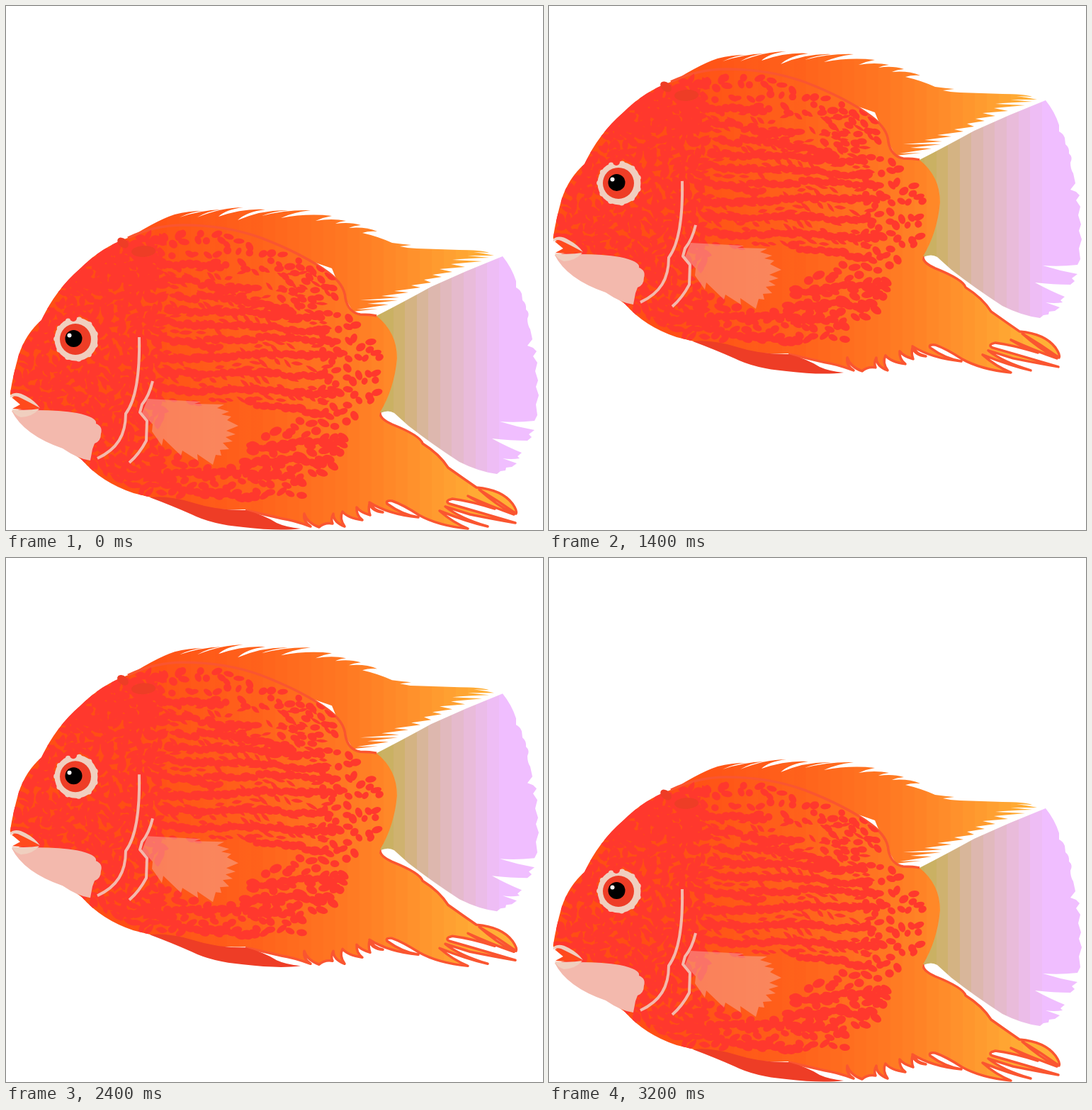
An HTML page with a canvas for the animation above (3.4 s loop, 758 px wide and 739 px high).

```html
<!DOCTYPE html>
<html lang="en">
<head>
<meta charset="utf-8">
<title>Swimming fish</title>
<style>
html, body { margin: 0; width: 100%; height: 100%; overflow: hidden; background: #fff; }
canvas { display: block; }
</style>
</head>
<body>
<canvas id="stage" width="758" height="739"></canvas>
<script>
const ctx = document.getElementById('stage').getContext('2d');
const W = 758, H = 739, STEP = 200, LOOP = 3400;
const RED = '#ff382d', DARK = '#ee3d26', PINK = '#f3b9ad', BEIGE = '#f0cfbf', EDGE = '#fa5530';

const path = d => new Path2D(d);

const tail = path(`M523 437 Q560 418 600 396 Q650 373 701 353 Q714 369 720 388 L720 397 Q726 400 728 406
  L729 415 Q735 420 734 428 Q740 433 736 441 Q736 450 740 456 L743 470 L736 479 L744 482 L749 487
  L744 494 L750 503 L747 515 L751 528 L748 537 L752 549 L748 562 L750 577 L746 585 Q720 588 697 586
  L722 593 L746 598 L738 604 L742 608 L736 613 Q712 613 686 610 Q708 622 728 630 L722 635 L725 638
  Q713 640 701 638 L721 645 L714 650 L706 651 L705 655 L698 656 L693 660 Q668 657 640 643
  Q600 617 568 592 L548 574 Q540 569 528 574 Z`);

const dorsal = path(`M160 336 Q210 303 238 294 Q258 289 277 289 Q262 290 245 298 Q275 288 304 287
  Q285 289 270 298 Q305 284 335 284 Q310 287 300 297 Q335 285 366 287 Q340 290 327 302
  Q362 287 398 288 Q375 290 361 296 Q395 287 430 288 Q405 291 388 299 Q425 292 460 296
  Q448 298 437 303 Q460 299 480 303 Q470 304 465 307 Q485 304 501 309 Q490 310 484 313
  Q508 311 524 318 Q512 317 503 320 Q525 325 545 334 Q560 336 572 337 Q564 338 556 339
  Q568 342 580 342 L640 344 Q670 344 682 348 L660 347 Q676 349 689 352 L652 352 L682 355
  Q650 356 630 358 L672 360 L628 364 L648 368 L612 371 L630 375 L602 379 L615 382 L590 386
  L600 390 L572 394 L585 397 L548 402 L568 404 L530 409 L555 411 L500 415 L553 415 L510 420
  L540 421 L495 428 L525 427 L490 431 Q476 410 460 370 L300 315 L200 330 Z`);

const anal = path(`M528 573 Q527 582 545 590 Q585 606 588 617 Q612 632 624 651 Q645 666 664 679
  Q700 682 715 702 Q722 712 720 716 Q695 698 668 682 Q690 702 717 717 Q685 706 652 691
  Q670 702 690 709 Q655 698 630 695 Q618 698 626 702 Q675 716 719 729 Q690 724 655 717 L620 706
  Q640 722 680 734 Q650 727 612 712 Q630 728 652 737 Q610 733 583 718 Q560 703 545 698
  Q535 697 538 702 Q560 718 582 721 Q540 717 513 700 Q518 711 532 714 Q517 713 513 702
  Q511 710 514 718 Q500 714 495 707 Q494 718 503 725 Q482 722 475 713 Q470 723 478 734
  Q462 728 462 716 Q458 724 461 730 Q450 728 442 735 Q425 729 421 716 Q419 727 430 734
  Q405 725 390 723 Q360 716 338 711`);

const body = path(`M6 545 Q10 520 18 492 Q28 462 50 443 Q70 400 105 370 Q135 340 172 327
  Q210 309 250 309 Q310 309 360 327 Q420 350 455 376 Q478 393 479 412 Q483 432 500 435
  Q515 435 523 437 Q552 460 552 497 Q548 540 528 573 Q515 650 430 705 L338 710
  Q290 712 240 702 Q205 693 180 687 Q135 672 107 640 L10 572 L30 566 L6 548 Z`);

const backLine = path(`M172 327 Q210 309 250 309 Q310 309 360 327 Q420 350 455 376
  Q478 393 479 412 Q483 432 500 435 Q515 435 523 437`);

const spotted = path(`M6 545 L20 490 L50 443 L105 368 L170 326 L245 314 L340 324 L440 366 L466 386
  L470 425 L500 450 L526 482 L536 535 L515 560 L486 590 L484 632 L440 668 L420 692 L330 700
  L235 690 L180 685 L107 640 L10 572 Z`);
const bare = path('M200 592 L330 562 L400 590 L350 612 L328 650 L270 648 L215 615 Z');

const ventral = path(`M203 693 Q228 690 262 700 Q300 712 338 711 Q365 718 382 729 Q395 735 416 737
  Q385 741 335 735 Q290 731 262 717 Q235 705 203 693 Z`);
const pectoral = path(`M200 554 L275 558 L266 561 L308 562 L298 567 L315 572 L304 576 L318 579
  L312 584 L328 592 L311 599 L324 604 L310 608 L320 614 L306 616 L315 625 L302 626 L304 634
  L296 633 L292 647 L270 632 L271 641 L249 627 L247 634 L222 610 L220 620 L206 600 L207 590
  L192 574 Z`);
const chin = path(`M8 571 Q65 568 100 574 Q129 580 127 589 Q137 593 134 603 Q134 614 125 617
  L122 625 L119 641 Q102 639 80 624 Q25 605 8 571 Z`);
const lipTop = path('M6 549 Q14 542 28 550 Q41 557 48 567 Q30 557 17 551 Q11 549 6 552 Z');
const lipLow = path('M8 569 Q30 571 47 568 Q38 579 21 580 Q12 577 8 569 Z');
const mouth = path('M8 552 Q16 549 32 558 L47 567 Q26 570 9 568 L20 562 Z');
const gill = path('M188 467 C189 515 184 555 169 575 C169 605 157 625 129 638');
const gillBack = path('M207 529 Q202 550 192 562 L189 573 L199 585 L198 613 Q188 632 174 644');

// Colour ramp split into hard vertical bands.
function bands(x0, x1, size, stops) {
  const g = ctx.createLinearGradient(x0, 0, x1, 0);
  for (let x = x0; x < x1; x += size) {
    const mid = x + size / 2;
    let i = 1;
    while (i < stops.length - 1 && stops[i][0] < mid) i++;
    const [a, b] = [stops[i - 1], stops[i]];
    const u = Math.max(0, Math.min(1, (mid - a[0]) / (b[0] - a[0])));
    const c = [1, 2, 3].map(k => Math.round(a[k] + (b[k] - a[k]) * u));
    g.addColorStop((x - x0) / (x1 - x0), `rgb(${c})`);
    g.addColorStop(Math.min(1, (x + size) / (x1 - x0) - x0 / (x1 - x0)), `rgb(${c})`);
  }
  return g;
}
const orange = bands(6, 737, 17, [
  [170, 255, 78, 20], [350, 255, 97, 27], [480, 255, 120, 34], [550, 255, 138, 41], [680, 255, 176, 54]
]);
const lilac = bands(514, 762, 16.5, [
  [530, 200, 176, 92], [560, 208, 178, 115], [600, 220, 183, 170], [650, 232, 187, 215], [700, 240, 190, 255]
]);

let seed = 71;
const rand = () => (seed = (seed * 16807) % 2147483647) / 2147483647;
const spread = n => (rand() - 0.5) * 2 * n;

const spots = new Path2D();
function oval(x, y, rx, ry, angle) {
  const p = new Path2D();
  p.ellipse(x, y, rx, ry, angle, 0, Math.PI * 2);
  spots.addPath(p);
}
function leaf(x, y, rx, ry, angle) {
  const m = new DOMMatrix().translate(x, y).rotate(angle * 180 / Math.PI);
  spots.addPath(path(`M${-rx} 0 Q${-rx * 0.2} ${-ry * 2} ${rx} 0 Q${rx * 0.2} ${ry * 2} ${-rx} 0`), m);
}
function scatter(x0, y0, x1, y1, gap, shape) {
  for (let y = y0; y < y1; y += gap)
    for (let x = x0; x < x1; x += gap) {
      const px = x + spread(gap * 0.4), py = y + spread(gap * 0.4);
      if (ctx.isPointInPath(spotted, px, py) && !ctx.isPointInPath(bare, px, py)) shape(px, py);
    }
}
function row(x0, y0, x1, y1) {
  const n = Math.round((x1 - x0) / 10.5);
  for (let i = 0; i <= n; i++) {
    const u = i / n;
    oval(x0 + (x1 - x0) * u, y0 + (y1 - y0) * u + Math.sin(u * 9) * 2 + spread(2),
      6.5 + rand() * 3, 4.5 + rand() * 2, 0.15 + spread(0.45));
  }
}

// Head, crown, back, flank, tail root and belly.
scatter(8, 326, 224, 692, 10, (x, y) => leaf(x, y, 8 + rand() * 4, 3.4 + rand() * 2, spread(1.6)));
scatter(100, 345, 214, 405, 10, (x, y) => oval(x, y, 7, 4.5, spread(1)));
scatter(224, 320, 470, 378, 15, (x, y) => oval(x, y, 5 + rand() * 3, 3.5 + rand() * 2, spread(1.2)));
scatter(224, 378, 460, 560, 16, (x, y) => leaf(x, y, 6 + rand() * 4, 2.2 + rand(), 0.3 + spread(0.6)));
scatter(390, 372, 470, 435, 14, (x, y) => oval(x, y, 7, 4.5, 0.4 + spread(0.5)));
scatter(450, 440, 540, 585, 15, (x, y) => oval(x, y, 5 + rand() * 3, 4 + rand() * 1.5, spread(1.3)));
scatter(224, 590, 490, 698, 14, (x, y) => oval(x, y, 6 + rand() * 3, 4 + rand() * 2, spread(0.7)));
[
  [220, 362, 300, 368], [225, 384, 288, 392], [300, 398, 352, 396], [245, 410, 332, 410],
  [330, 414, 400, 430], [230, 427, 435, 438], [225, 446, 450, 458], [285, 468, 465, 472],
  [228, 468, 300, 482], [225, 496, 470, 490], [225, 516, 455, 521], [225, 539, 470, 546],
  [345, 559, 456, 576], [350, 622, 470, 612], [338, 643, 455, 640], [240, 656, 400, 662],
  [165, 660, 235, 667], [250, 682, 350, 692]
].forEach(r => row(...r));

function fill(p, color) {
  ctx.fillStyle = color;
  ctx.fill(p);
}
function stroke(p, color, width) {
  ctx.strokeStyle = color;
  ctx.lineWidth = width;
  ctx.stroke(p);
}
function disc(x, y, r, color) {
  ctx.beginPath();
  ctx.arc(x, y, r, 0, Math.PI * 2);
  ctx.fillStyle = color;
  ctx.fill();
}
function blot(x, y, rx, ry, angle) {
  ctx.beginPath();
  ctx.ellipse(x, y, rx, ry, angle, 0, Math.PI * 2);
  ctx.fillStyle = DARK;
  ctx.fill();
}

function drawEye() {
  disc(99, 470, 30.5, BEIGE);
  for (let i = 0; i < 11; i++) {
    const a = i * 0.571 + 0.3;
    disc(99 + 28 * Math.cos(a), 470 + 28 * Math.sin(a), 3.8, BEIGE);
  }
  disc(95, 440, 5, RED);
  disc(98, 470, 22, DARK);
  disc(95.5, 469, 12, '#000');
  disc(89.5, 464.5, 3, '#fff');
}

function drawFish() {
  fill(tail, lilac);
  fill(dorsal, orange);
  fill(anal, orange);
  stroke(anal, EDGE, 3.5);
  fill(body, orange);
  stroke(backLine, EDGE, 3.5);
  ctx.save();
  ctx.clip(body);
  fill(spots, RED);
  ctx.restore();
  blot(165, 334, 9, 6, 0.7);
  blot(194, 346, 17, 8, -0.05);
  fill(ventral, DARK);
  ctx.globalAlpha = 0.45;
  fill(pectoral, PINK);
  ctx.globalAlpha = 1;
  stroke(gill, PINK, 4);
  stroke(gillBack, PINK, 4);
  fill(mouth, '#ff4a1c');
  fill(chin, PINK);
  fill(lipTop, BEIGE);
  fill(lipLow, BEIGE);
  drawEye();
}

// Rises for nine steps, sinks for seven, then rests for one.
function lift(step) {
  return step <= 9 ? -283 * step / 9 : -283 * (16 - step) / 7;
}

let shown = -1;
function tick(now) {
  const step = Math.floor(now % LOOP / STEP);
  if (step !== shown) {
    shown = step;
    ctx.clearRect(0, 0, W, H);
    ctx.save();
    ctx.translate(0, lift(step));
    drawFish();
    ctx.restore();
  }
  requestAnimationFrame(tick);
}
ctx.lineJoin = 'round';
tick(performance.now());
</script>
</body>
</html>
```
